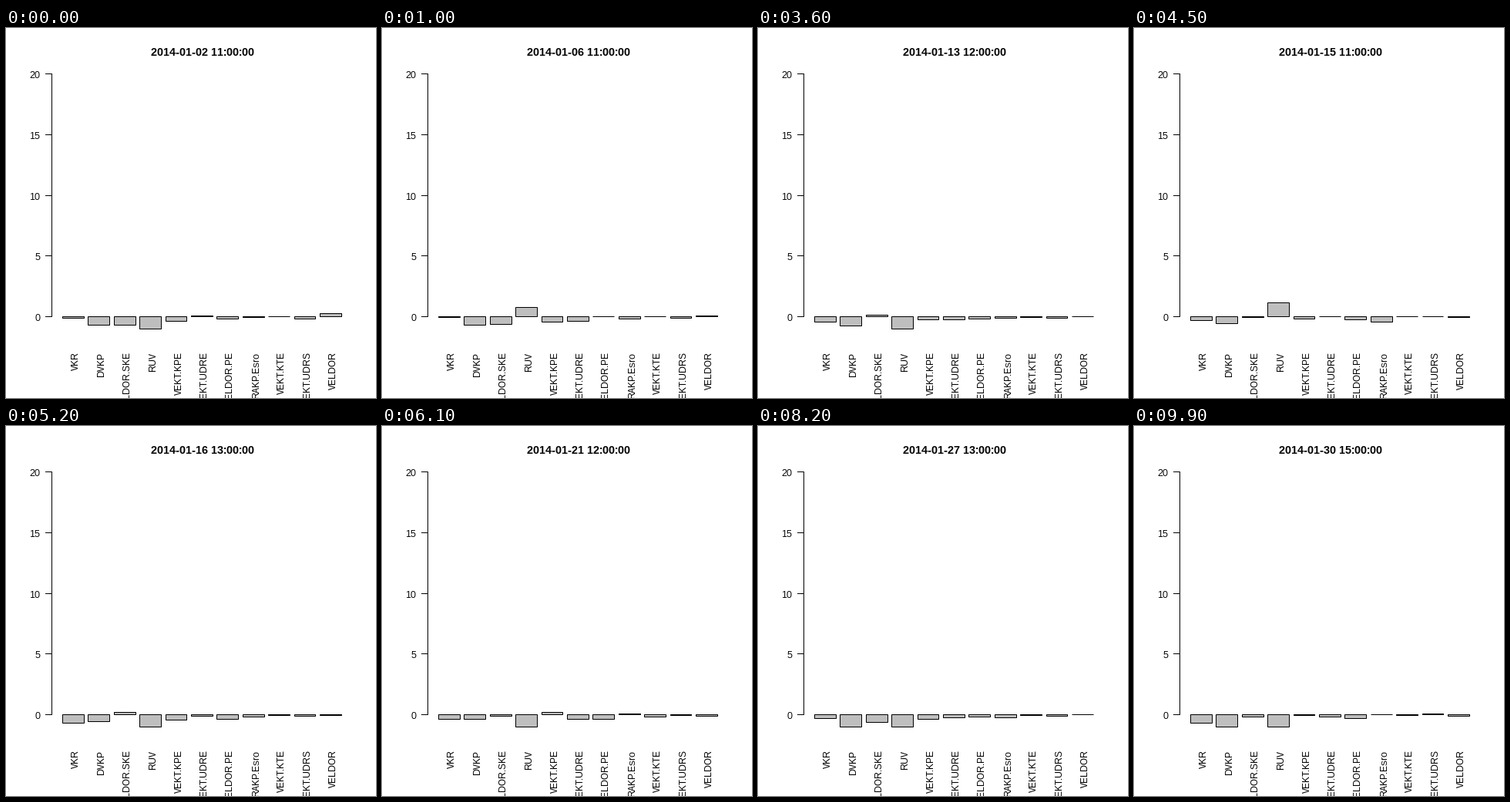
A matplotlib script that plays this animation: 480x480 px, repeating every 10 s.

```python
import numpy as np
import matplotlib.pyplot as plt
from matplotlib.animation import FuncAnimation
from matplotlib.patches import Rectangle

plt.rcParams.update({
    "font.family": "Liberation Sans",
    "text.hinting": "native",
    "text.hinting_factor": 1,
    "toolbar": "None",
})

SIZE, DPI = 480, 80
STEPS, STEP_MS = 100, 100
PX = 72 / DPI  # points per pixel

NAMES = ["VKR", "DVKP", "VELDOR.SKE", "RUV", "VEKT.KPE", "VEKT.UDRE",
         "VELDOR.PE", "RAKP.Esro", "VEKT.KTE", "VEKT.UDRS", "VELDOR"]
HALTED, IDLE = NAMES.index("DVKP"), NAMES.index("RUV")

# Weekdays of the month without the holiday, five hours each
DAYS = [d for d in range(2, 31) if d % 7 not in (4, 5) and d != 20]

# Plot region and value scale, in pixels
LEFT, RIGHT, TOP, BOTTOM = 59.04, 449.76, 59.04, 406.56
UNIT_Y = (BOTTOM - TOP) / 22
UNIT_X = (RIGHT - LEFT) / 14.04


def make_values():
    """Skewed hourly readings that calm down from the first bar to the last."""
    rng = np.random.default_rng(14)
    count = len(NAMES)
    centre = np.linspace(-.45, 0, count)
    spread = np.geomspace(.7, .1, count)
    noise = rng.normal(size=(STEPS, count))
    values = np.clip((1 + centre) * np.exp(spread * noise) - 1, -.92, 4)

    # One bar rests at the floor apart from rare bursts and one huge spike
    burst = rng.random(STEPS) < .08
    values[:, IDLE] = np.where(burst, rng.uniform(.3, 1.6, STEPS), -1)
    values[48, IDLE] = 24.5
    # Another stops for good late in the month
    values[66:, HALTED] = -1
    return values


def y_px(value):
    return np.floor(TOP + (20 - value) * UNIT_Y) + .5


def x_px(value):
    return np.floor(LEFT + (value + .32) * UNIT_X) + .5


def label(x, y, text, size=12, **style):
    return ax.text(x, y, text, fontsize=size * PX, color="black",
                   rotation_mode="anchor", va="baseline", **style)


def line(xs, ys):
    ax.plot(xs, ys, color="black", lw=PX, solid_capstyle="projecting",
            snap=False, zorder=1)


values = make_values()
fig = plt.figure(figsize=(SIZE / DPI, SIZE / DPI), dpi=DPI, facecolor="white")
ax = fig.add_axes([0, 0, 1, 1])
ax.axis("off")

axis_x = np.floor(LEFT) + .5
line([axis_x, axis_x], [y_px(20), y_px(0)])
for tick in range(0, 21, 5):
    y = y_px(tick)
    line([axis_x - 8, axis_x], [y, y])
    label(44.5, y + 5.5, str(tick), ha="right")

zero = y_px(0)
bars = []
for i, name in enumerate(NAMES):
    start = .2 + 1.2 * i
    x0, x1 = x_px(start), x_px(start + 1)
    bar = Rectangle((x0, zero), x1 - x0, 0, facecolor="#bebebe",
                    edgecolor="black", lw=PX, joinstyle="miter",
                    snap=False, zorder=2)
    bars.append(ax.add_patch(bar))
    label((x0 + x1) // 2 + 7, 420, name, rotation=90, ha="right")

title = label(255, 36, "", 14, weight="bold", ha="center")
ax.set_xlim(0, SIZE)
ax.set_ylim(SIZE, 0)


def draw(step):
    day, hour = divmod(step, 5)
    title.set_text(f"2014-01-{DAYS[day]:02d} {11 + hour}:00:00")
    for bar, value in zip(bars, values[step]):
        y = y_px(value)
        bar.set_y(min(y, zero))
        bar.set_height(abs(y - zero))
    return [title, *bars]


anim = FuncAnimation(fig, draw, frames=STEPS, interval=STEP_MS,
                     init_func=lambda: draw(0), repeat=True)
plt.show()
```
